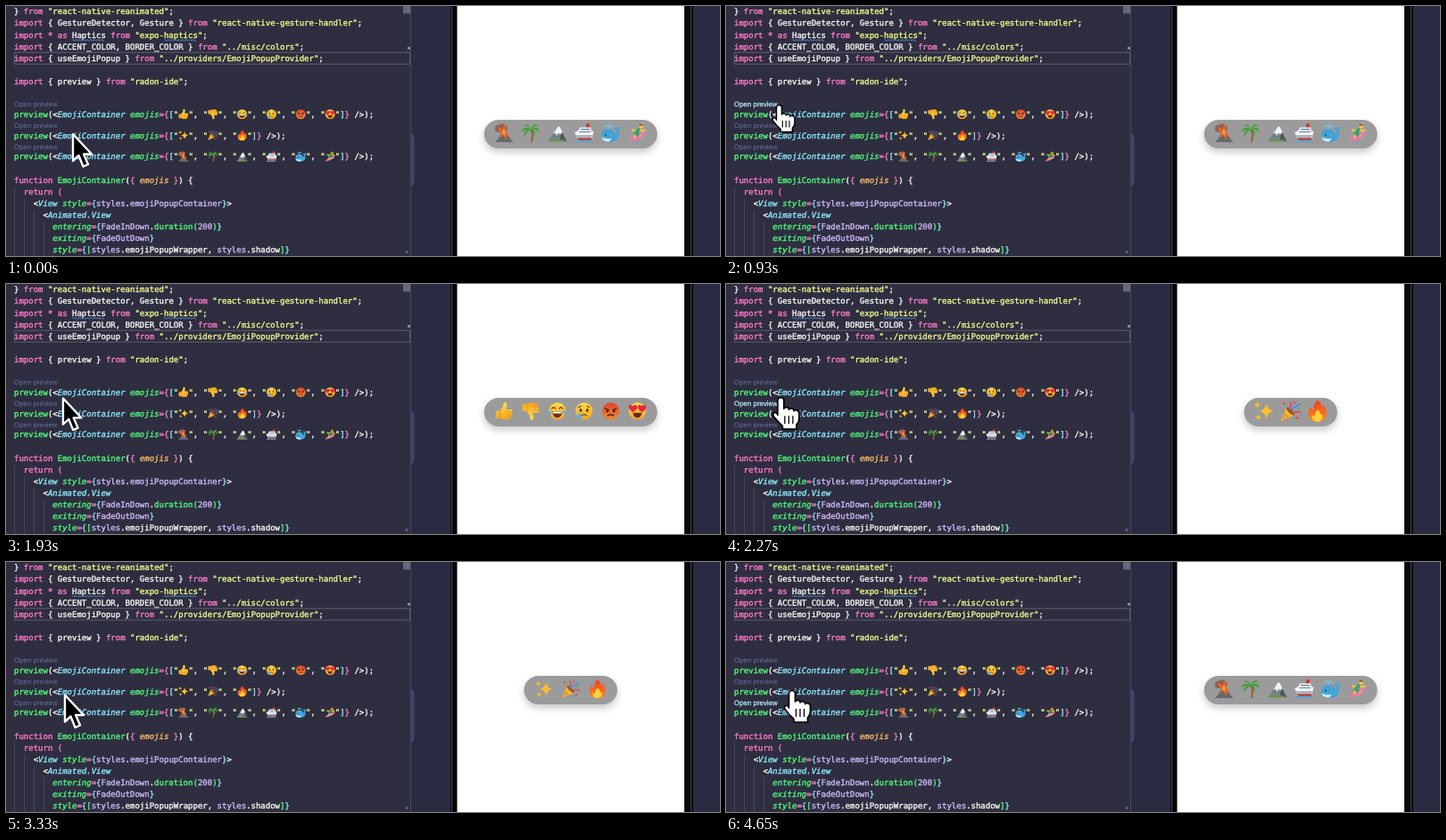
Recreate the animation shown at these times as an HTML page. Size 800 px wide and 281 px high, loop 4.77 s.

```html
<!DOCTYPE html>
<html lang="en">
<head>
<meta charset="utf-8">
<title>Component preview</title>
<style>
html, body { margin: 0; width: 100%; height: 100%; overflow: hidden; background: #2e2f40; }
svg { display: block; }
#stage { width: 100vw; height: 100vh; }
text { white-space: pre; text-rendering: geometricPrecision; }
.code { font: 9px "DejaVu Sans Mono", monospace; stroke-width: .36px; }
.label { font: 7.9px "Liberation Sans", Arial, sans-serif; fill: #64719f; }
.label.on { fill: #b4eaf8; stroke: #b4eaf8; stroke-width: .25px; }
.p { fill: #ff79c6; stroke: #ff79c6; }
.w { fill: #f8f8f2; stroke: #f8f8f2; }
.y { fill: #f1fa8c; stroke: #f1fa8c; }
.g, .G { fill: #50fa7b; stroke: #50fa7b; }
.b, .c { fill: #8be9fd; stroke: #8be9fd; }
.o { fill: #ffb86c; stroke: #ffb86c; }
.v { fill: #cfb8fa; stroke: #cfb8fa; }
.G, .c, .o { font-style: italic; }
</style>
</head>
<body>
<svg id="stage" viewBox="0 0 800 281" preserveAspectRatio="none">
  <defs>
    <linearGradient id="skin" x2="0" y2="1"><stop stop-color="#ffdc4a"/><stop offset="1" stop-color="#f5a51f"/></linearGradient>
    <linearGradient id="rage" x2="0" y2="1"><stop stop-color="#e0452c"/><stop offset="1" stop-color="#f08a2c"/></linearGradient>
    <linearGradient id="flame" x2="0" y2="1"><stop stop-color="#f0401f"/><stop offset="1" stop-color="#ff8a1c"/></linearGradient>
    <filter id="blur" x="-20%" y="-50%" width="140%" height="220%"><feGaussianBlur stdDeviation="4"/></filter>

    <symbol id="up" viewBox="0 0 24 24">
      <path fill="url(#skin)" d="M2 12h5l4-6c.5-2-.2-4.500 1.700-5S16 3 15.500 6l-1 4H20c2.400 0 2.900 2.200 1.500 3.200 1.300 1 .9 2.800-.5 3.300.7 1.300 0 2.600-1.200 2.900.2 1.700-.7 2.800-2.200 2.800H11l-3-1.200H2z"/>
      <path fill="none" stroke="#d98a14" stroke-width=".8" d="M21.500 13.200h-6M21 16.500h-6M19.800 19.400h-5M7 12.500v8"/>
    </symbol>
    <symbol id="down" viewBox="0 0 24 24"><use href="#up" width="24" height="24" transform="matrix(1 0 0 -1 0 24)"/></symbol>
    <symbol id="joy" viewBox="0 0 24 24">
      <circle cx="12" cy="12" r="10.500" fill="url(#skin)"/>
      <path fill="none" stroke="#6b3d0c" stroke-width="1.500" d="M5 9.500q2.500-4 5 0M14 9.500q2.500-4 5 0"/>
      <path fill="#6b2c12" d="M6 12.500h12q-.5 7.500-6 7.500t-6-7.500z"/>
      <path fill="#fff" d="M6.500 12.700h11l-.5 2.200H7z"/>
      <path fill="#4fb2f2" d="M5 10.500q0 6-3 6.500-3-1 0-4zM19 10.500q0 6 3 6.500 3-1 0-4z"/>
    </symbol>
    <symbol id="cry" viewBox="0 0 24 24">
      <circle cx="12" cy="12" r="10.500" fill="url(#skin)"/>
      <ellipse cx="8" cy="11" rx="1.500" ry="2" fill="#5a3410"/><ellipse cx="16" cy="11" rx="1.500" ry="2" fill="#5a3410"/>
      <path fill="none" stroke="#6b3d0c" stroke-width="1.300" d="M5 7.500q2-.5 3.500-2M19 7.500q-2-.5-3.500-2M8.500 18q3.500-3.500 7 0"/>
      <path fill="#4fb2f2" d="M6.500 13.500q3.500 5.500 1.500 7.500-2 1.500-4 0-1.500-2 2.500-7.500z"/>
    </symbol>
    <symbol id="angry" viewBox="0 0 24 24">
      <circle cx="12" cy="12" r="10.500" fill="url(#rage)"/>
      <ellipse cx="8" cy="12" rx="1.500" ry="1.800" fill="#4a1810"/><ellipse cx="16" cy="12" rx="1.500" ry="1.800" fill="#4a1810"/>
      <path fill="none" stroke="#4a1810" stroke-width="1.500" d="M4.500 8.500l5.500 2.500M19.500 8.500L14 11M8 18q4-3.500 8 0"/>
    </symbol>
    <symbol id="love" viewBox="0 0 24 24">
      <circle cx="12" cy="12" r="10.500" fill="url(#skin)"/>
      <path id="heart" fill="#e8283c" d="M6.500 13.500Q.5 9.500 1.500 6T6.500 6q3-3 5 0t-5 7.500z"/>
      <use href="#heart" x="11"/>
      <path fill="#6b2c12" d="M6.500 14h11q-1 6-5.500 6t-5.500-6z"/>
    </symbol>
    <symbol id="spark" viewBox="0 0 24 24" fill="#fbbf2c">
      <path d="M14.500 3.500q1 7 7.500 8.500-6.500 1.500-7.500 8.500-1-7-7.500-8.500 6.500-1.500 7.500-8.500z"/>
      <path d="M5 1.500q.5 3.500 4 4-3.500.5-4 4-.5-3.500-4-4 3.500-.5 4-4zM6 15q.4 3 3.500 3.500Q6.400 19 6 22q-.4-3-3.500-3.500Q5.600 18 6 15z"/>
    </symbol>
    <symbol id="party" viewBox="0 0 24 24">
      <path fill="#f6b832" d="M1.500 22.500L7.500 8q5 2 8.500 8.500z"/>
      <path fill="none" stroke="#d9822b" stroke-width="1.300" d="M5 14.500l4.500 4.700M3.500 18l2.700 2.500"/>
      <ellipse cx="11.800" cy="12.200" rx="2" ry="6" fill="#a05a28" transform="rotate(-45 11.800 12.200)"/>
      <path fill="none" stroke-width="1.600" stroke="#d9467c" d="M11 9q3-3 0-7M15 14q4-2.500 8 0"/>
      <path fill="none" stroke-width="1.600" stroke="#468fe0" d="M13 11q2-4 6-4 1-2 3.500-3"/>
      <g fill="#e84545"><circle cx="5" cy="4" r="1.300"/><circle cx="16" cy="3" r="1.200"/><circle cx="19" cy="19" r="1.300"/></g>
      <g fill="#54b854"><circle cx="8" cy="5" r="1"/><circle cx="20.500" cy="10" r="1.200"/><circle cx="16.500" cy="20" r="1"/></g>
    </symbol>
    <symbol id="fire" viewBox="0 0 24 24">
      <path fill="url(#flame)" d="M12 .5q5 3 4.500 8.500 1.500-1 1.500-3.500 4.500 5 3.500 10.500-1.500 7.500-9.500 7.500T2.500 16Q2 11 5.500 7.500q0 3 2 4Q7.500 5 12 .5z"/>
      <path fill="#ffd23c" d="M12.500 10.500q4 4 2.500 6l2-1.500q2 7.500-5 8.200-7-.7-5.500-7l2.500 2q0-4.500 3.500-7.700z"/>
    </symbol>
    <symbol id="volcano" viewBox="0 0 24 24">
      <path fill="#8a6452" d="M5 11Q0 10 1 6.500 1 2 5.500 2q4-3 7.500 0 4 1 3 5l-3 4z"/>
      <path fill="#64686d" d="M1 23Q7 18 9 10l5-1q4 9 9.500 14z"/>
      <path fill="#f0642c" d="M9 12Q6 10 3.500 4.500 8 5 10 8q1-5 5.500-6.500Q13.500 5 14 9l5 8-3.500-2-.5 6-4-7-4 5z"/>
      <path fill="#ffb02e" d="M10 10.500l2-3 1.500 3-1 4.500z"/>
    </symbol>
    <symbol id="palm" viewBox="0 0 24 24">
      <path fill="none" stroke="#9a6735" stroke-width="2.500" d="M12.500 7q3 7 .5 16"/>
      <path fill="#3f9b3b" d="M12 7Q8-1 3 3q5-.5 6 3Q2 4 1 11q3-4 7-3-5 2-4 8 3-6 8-8 3 2 4 8 3-5-1-8 5-1 7 3 1-6-6-6 2-3 6-2-5-5-10 4z"/>
      <path fill="#72bd45" d="M12 7Q9 2 5 3q4 0 5 3zM13 7q4-4 7-3-3 1-5 3z"/>
    </symbol>
    <symbol id="mount" viewBox="0 0 24 24">
      <path fill="#74818c" d="M1 22L12 4.500q1.500-1.500 3 0L23.500 22z"/>
      <path fill="#4c575f" d="M14 4l9.500 18H15l1-7z"/>
      <path fill="#f1f5f8" d="M13 3.500L7 13l3-1 1.500 3.500 2-4 2 3 1.500-3 2 1-4-8z"/>
      <path fill="#6d9448" d="M0 22.500q5-6 11-2 6-2 13 2z"/>
    </symbol>
    <symbol id="ship" viewBox="0 0 24 24">
      <path fill="#d8322c" d="M14.500.5H19l-.5 5.500h-4z"/>
      <path fill="#f3f5f7" d="M5 9l2-4h13l1 4.500h3L21 20H5L.5 11.500z"/>
      <path fill="#567f9c" d="M8 6.800h11v1.300H8zM6 10h14v1.100H6z"/>
      <path fill="#aab6c0" d="M2.500 14.500H22l-1 3.500H4z"/>
      <path fill="#b8403a" d="M4 18h17.500l-1 3H5z"/>
      <path fill="#4fa5dc" d="M2 21q3-1.500 5 0t5 0 5 0 5 0V23H2z"/>
    </symbol>
    <symbol id="whale" viewBox="0 0 24 24">
      <path fill="none" stroke="#6fc8f2" stroke-width="1.700" d="M9 8V4Q6 1 4.500 4M9 4q3-3 4.500 0"/>
      <path fill="#41a4d8" d="M.5 15.500Q.5 7 9 7q6 0 9 6 2-1 1.500-4-3 0-3-3.500 2.500-.5 4 1 1-2.500 3-2.500 1 3-1.500 5Q24 23 11 23 .5 23 .5 15.500z"/>
      <path fill="#d5eaf3" d="M1 17q6 3 12 1.500-1 4-4.500 4Q2 22 1 17z"/>
      <circle cx="6" cy="14" r="1" fill="#173244"/>
    </symbol>
    <symbol id="surf" viewBox="0 0 24 24">
      <path fill="#ee78ac" d="M1 22.500Q4 15 23 10.500 19 20 1 22.500z"/>
      <path fill="none" stroke="#f7c13c" stroke-width="2.400" d="M13 7L9 9.500 5 8M14 7l4 3 4-2M10 14l-2 4M13 13l3 3"/>
      <path fill="none" stroke="#3c9e70" stroke-width="4" d="M14.500 6L10 12l4 3"/>
      <circle cx="16.500" cy="4" r="2.700" fill="#f7c13c"/><path fill="#7a4a26" d="M13.500 3q2-4 6 0z"/>
    </symbol>
  </defs>

  <rect width="800" height="281" fill="#292b42"/>
  <rect width="453" height="281" fill="#2e2e40"/>
  <path fill="none" stroke="#45475b" d="M453.500 0V281M9.500 203V281M20.500 216V281M31.500 229V281M42.500 242V281"/>
  <rect x="9.500" y="52.200" width="443" height="13" fill="none" stroke="#5c5d70"/>
  <rect x="445" width="8" height="8.500" fill="#66677a"/>
  <rect x="450" y="46" width="3" height="3" fill="#6d93a8"/>
  <rect x="447.500" y="275" width="3" height="3" rx="1" fill="#626376"/>
  <path fill="#41436a" d="M454 143q3.500 1 3.500 6v48q0 5-3.500 6z"/>
  <g id="editor"></g>

  <rect x="498" width="272" height="281" fill="#08080b"/>
  <path stroke="#44464f" d="M499.500 0V281M767.500 0V281"/>
  <rect x="505.500" width="254.500" height="281" fill="#fff"/>
  <rect id="shade" y="132" height="32" rx="16" fill="#000" opacity=".22" filter="url(#blur)"/>
  <rect id="pill" y="128" height="32" rx="16" fill="#9b9b9c"/>
  <g id="sets"></g>

  <path id="arrow" fill="#000" stroke="#fff" stroke-width="2.400" stroke-linejoin="round" d="M1 1V31L7.500 25 12.500 37.500 18 35 13 23.500H22z"/>
  <g id="hand" stroke="#000" stroke-width="1.700" stroke-linejoin="round">
    <path fill="#fff" d="M-3.500 1Q-3.500-2.500 0-2.500T3.500 1V10Q4.500 8 7 8.500T9 11Q10.500 9 13 10T14.500 12.500Q16 11 18.500 12T20.500 16V21Q20.500 25 17.500 28V33H2V29.500Q-3 25-8 18.500-9.500 15.500-7 14.500T-3.500 17z"/>
    <path fill="none" stroke-width="1.300" d="M4.500 18V27M9 18V27M13.500 18V27"/>
  </g>
</svg>
<script>
const NS = "http://www.w3.org/2000/svg";
const byId = id => document.getElementById(id);
const LOOP = 4770, CHAR = 5.418, GLYPH = 11.2, MID = 632.7;

function add(parent, tag, attrs, text) {
  const el = document.createElementNS(NS, tag);
  for (const k in attrs) el.setAttribute(k, attrs[k]);
  if (text) el.textContent = text;
  return parent.appendChild(el);
}

const icon = (parent, name, x, y, size) =>
  add(parent, "use", { href: "#" + name, x: x - size / 2, y: y - size / 2, width: size, height: size });

// Each "~" starts a token; its first letter is the colour class, "e" is an emoji.
function line(y, indent, src) {
  let x = 9 + indent * CHAR;
  for (const token of src.split("~").slice(1)) {
    const kind = token[0], text = token.slice(1);
    if (kind === "e") {
      icon(byId("editor"), text, x + GLYPH / 2, y - 3.2, 12.5);
      x += GLYPH;
    } else {
      add(byId("editor"), "text", { x, y, class: "code " + kind }, text);
      x += text.length * CHAR;
    }
  }
}

const sets = [
  ["up", "down", "joy", "cry", "angry", "love"],
  ["spark", "party", "fire"],
  ["volcano", "palm", "mount", "ship", "whale", "surf"]
];

[
  [9.2, 0, '~w} ~pfrom ~y"react-native-reanimated"~w;'],
  [22.4, 0, '~pimport ~w{ GestureDetector, Gesture } ~pfrom ~y"react-native-gesture-handler"~w;'],
  [35.5, 0, '~pimport * as ~wHaptics ~pfrom ~y"expo-haptics"~w;'],
  [48.6, 0, '~pimport ~w{ ACCENT_COLOR, BORDER_COLOR } ~pfrom ~y"../misc/colors"~w;'],
  [61.8, 0, '~pimport ~w{ useEmojiPopup } ~pfrom ~y"../providers/EmojiPopupProvider"~w;'],
  [88, 0, '~pimport ~w{ preview } ~pfrom ~y"radon-ide"~w;'],
  [198.7, 0, '~pfunction ~gEmojiContainer~w(~p{ ~oemojis ~p}~w) {'],
  [211.8, 2, '~preturn ('],
  [224.9, 4, '~w<~cView ~Gstyle~p=~b{~vstyles~w.~vemojiPopupContainer~b}~w>'],
  [238, 6, '~w<~cAnimated.View'],
  [251, 8, '~Gentering~p=~b{~vFadeInDown~w.~gduration(~v200~g)~b}'],
  [264.1, 8, '~Gexiting~p=~b{~vFadeOutDown~b}'],
  [277.2, 8, '~Gstyle~p=~b{~g[~vstyles~w.emojiPopupWrapper, ~vstyles~w.shadow~g]~b}']
].forEach(args => line(...args));

function squiggle(x, n) {
  add(byId("editor"), "path", { d: `M${x} 38.500` + "q1-1.600 2 0t2 0".repeat(n), fill: "none", stroke: "#5a9fe0", "stroke-width": .8 });
}
squiggle(74, 9);
squiggle(177, 9);

const labels = [], groups = [];
sets.forEach((names, i) => {
  const y = 124.8 + i * 23.8;
  labels.push(add(byId("editor"), "text", { x: 9, y: y - 11.5, class: "label" }, "Open preview"));
  line(y, 0, "~gpreview~w(<~cEmojiContainer ~Gemojis~p={~b[" +
    names.map(n => `~y"~e${n}~y"`).join("~w, ") + "~b]~p}~w />);");
  const g = add(byId("sets"), "g", {});
  names.forEach(n => icon(g, n, 0, 0, 22));
  groups.push(g);
});

// time, x, y of the pointer tip
const path = [
  [0, 74, 143], [120, 73, 141], [620, 60, 115], [930, 59.5, 113.5], [1500, 60, 114],
  [1930, 63, 127.5], [2080, 62, 130], [2600, 60, 130.5], [2750, 60, 131],
  [3330, 65, 148.5], [3600, 74, 147], [4770, 74, 147]
];
const hovers = [[380, 1640], [2000, 2600], [3470, LOOP]];
const clicks = [930, 2040, 3580];
const swaps = [[-1100, 2], [1270, 0], [2070, 1], [3670, 2]];

function pointerAt(t) {
  const i = path.findIndex(p => p[0] > t), [t0, x0, y0] = path[i - 1], [t1, x1, y1] = path[i];
  const u = (t - t0) / (t1 - t0), e = u * u * (3 - 2 * u);
  return [x0 + (x1 - x0) * e, y0 + (y1 - y0) * e];
}

function show(el, on) { el.setAttribute("display", on ? "inline" : "none"); }

function draw(t) {
  const [since, shown] = swaps.filter(s => s[0] <= t).pop();
  groups.forEach((g, i) => show(g, i === shown));
  const icons = [...groups[shown].children];
  const scale = 1 + .25 * Math.max(0, 1 - (t - since) / 600);
  icons.forEach((el, k) => {
    const x = MID + (k - (icons.length - 1) / 2) * 29.9;
    el.setAttribute("transform", `translate(${x} 142.8) scale(${scale})`);
  });
  const width = shown === 1 ? 104.5 : 194;
  for (const id of ["pill", "shade"]) {
    byId(id).setAttribute("x", MID - width / 2);
    byId(id).setAttribute("width", width);
  }

  const row = hovers.findIndex(([a, b]) => t >= a && t < b);
  labels.forEach((l, i) => l.classList.toggle("on", i === row));
  const press = Math.max(...clicks.map(c => Math.max(0, 1 - Math.abs(t - c) / 130)));
  const [x, y] = pointerAt(t), place = `translate(${x} ${y}) scale(${1 - .15 * press})`;
  for (const id of ["arrow", "hand"]) {
    byId(id).setAttribute("transform", place);
    show(byId(id), (id === "hand") === (row >= 0));
  }
}

const start = performance.now();
function tick() {
  draw((performance.now() - start) % LOOP);
  requestAnimationFrame(tick);
}
tick();
</script>
</body>
</html>
```
